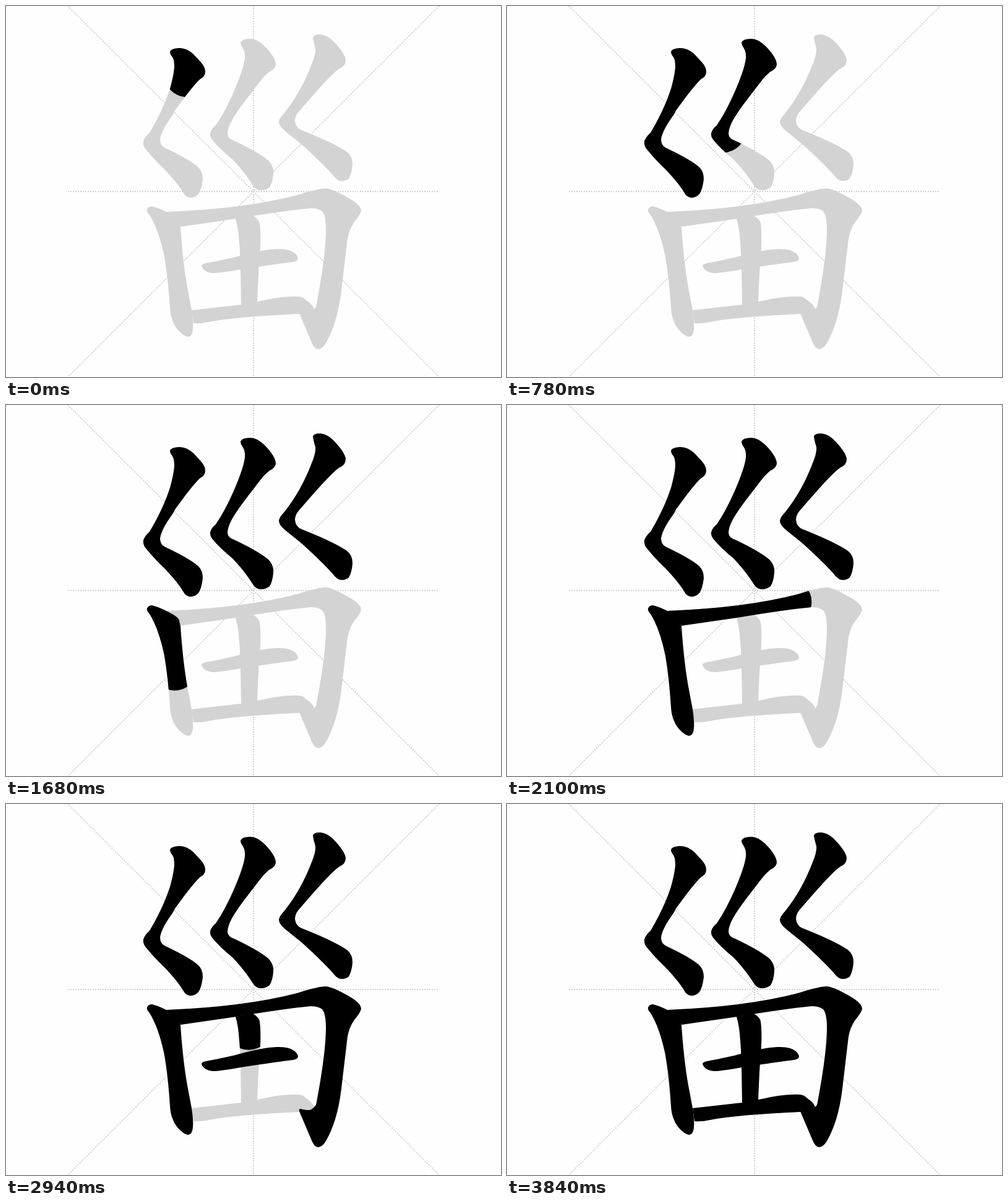
An HTML page for the animation above (3.9 s loop, 800x600 px).

```html
<!DOCTYPE html>
<html lang="zh">
<head>
<meta charset="utf-8">
<title>Stroke order</title>
<style>
  html, body { margin: 0; width: 100%; height: 100%; overflow: hidden; background: #fefefe; }
  svg { display: block; width: 100vw; height: 100vh; }
  .grid { stroke: #d3d3d3; stroke-width: 2; stroke-dasharray: 2 2; }
  .shadow { fill: #d3d3d3; }
  .brush { fill: none; stroke: #000; stroke-width: 75; stroke-linecap: round; stroke-linejoin: round; }
</style>
</head>
<body>
<svg id="stage" viewBox="0 0 800 600">
  <path class="grid" d="M100 300H700M400 0V600M100 0L700 600M700 0L100 600"/>
</svg>
<script>
const LOOP = 3900, STEP = 60;

// Each stroke: outline, brush path, start and duration in ms.
const strokes = [
  {
    outline: "M265 74Q266 69 279 68Q291 67 303 78L315 91Q322 99 322 106Q322 114 314 118Q307 124 290 146L273 169Q271 174 268 178Q250 203 249 216Q249 226 258 230Q296 248 310 260Q318 267 318 280Q316 297 311 304Q306 310 297 310Q290 309 286 301Q277 286 255 263Q240 249 227 233Q221 227 222 219Q224 212 232 205Q254 168 265 134Q272 108 272 97Q272 85 267 80Q265 77 265 74Z",
    brush: "M270 74L294 100L293 110L266 166L236 216L262 245L301 295",
    start: -129, time: 760
  },
  {
    outline: "M379 59Q381 53 395 53Q405 53 417 64Q436 83 436 95Q435 102 426 106Q418 112 409 124L386 154Q373 171 365 185Q358 198 358 207Q359 215 369 218Q409 237 424 250Q433 259 432 271Q431 285 426 293Q420 298 412 298Q404 298 399 290Q386 269 366 248Q345 231 333 216Q328 209 331 203Q333 198 339 193Q354 171 368 139Q384 102 386 85Q387 74 382 67Q379 63 379 59Z",
    brush: "M383 57L405 82L383 148L344 207L372 233L414 284",
    start: 329, time: 760
  },
  {
    outline: "M496 51Q497 46 508 46Q518 47 527 55Q547 75 549 87Q549 97 539 101Q525 110 473 171Q467 178 467 186Q468 197 478 201Q531 222 551 236Q560 243 560 256Q559 270 554 279Q549 283 543 283Q535 283 528 273Q511 254 478 224L452 203Q441 194 441 187Q442 181 449 174Q477 139 494 94Q501 78 500 68Q497 58 496 51Z",
    brush: "M500 50L521 86L489 138L454 187L485 215L543 268",
    start: 804, time: 760
  },
  {
    outline: "M228 329Q230 324 236 324Q245 326 259 333Q280 343 280 349L282 358Q286 416 293 455L300 492Q303 510 302 523Q301 535 294 535Q287 534 277 523Q266 509 265 488Q262 441 256 406Q247 362 232 338Q227 333 228 329Z",
    brush: "M232 329L262 350L272 420L290 510",
    start: 1254, time: 760
  },
  {
    outline: "M259 333Q385 328 470 306Q505 295 517 295Q530 296 561 315Q574 324 574 331Q573 336 567 344Q553 360 551 384L542 460Q536 512 517 545Q511 555 504 555Q498 554 494 544L474 497Q473 493 476 493Q484 495 489 495Q494 495 499 489Q501 488 502 482Q517 402 517 362Q517 339 511 332Q505 327 492 327Q450 331 372 344L282 357Q280 346 259 333Z",
    brush: "M265 345L400 328L500 310L540 322L533 400L512 485L500 525",
    start: 1719, time: 968
  },
  {
    outline: "M316 420Q317 417 323 416Q360 409 378 404Q415 394 437 393Q458 392 467 400Q472 405 472 409Q471 413 463 414Q444 416 379 426Q345 432 334 432Q322 431 317 423Z",
    brush: "M320 423L380 416L455 402",
    start: 2475, time: 520
  },
  {
    outline: "M371 344L399 339Q409 345 410 352Q412 365 411 391Q408 425 406 479L380 484Q379 400 377 383Q376 361 371 344Z",
    brush: "M373 340L392 356L393 485",
    start: 2827, time: 600
  },
  {
    outline: "M300 492L380 483Q413 477 426 474Q455 469 474 470Q481 471 484 475Q496 483 498 490Q493 496 488 496L473 498Q367 503 328 511Q315 514 303 513Z",
    brush: "M303 503L480 482",
    start: 3200, time: 640
  }
];

const stage = document.getElementById("stage");

function add(parent, name, attrs) {
  const node = document.createElementNS(stage.namespaceURI, name);
  for (const key in attrs) node.setAttribute(key, attrs[key]);
  return parent.appendChild(node);
}

strokes.forEach(s => add(stage, "path", { class: "shadow", d: s.outline }));
strokes.forEach((s, i) => {
  const clip = add(stage, "clipPath", { id: "clip" + i });
  add(clip, "path", { d: s.outline });
  s.node = add(stage, "path", { class: "brush", d: s.brush, "clip-path": `url(#clip${i})` });
  s.length = s.node.getTotalLength();
});

function draw(time) {
  for (const s of strokes) {
    const progress = Math.min(1, (time - s.start) / s.time);
    s.node.style.visibility = progress > 0 ? "visible" : "hidden";
    if (progress > 0) {
      s.node.style.strokeDasharray = `${progress * s.length} ${2 * s.length}`;
    }
  }
}

const begin = performance.now();
function tick() {
  const time = (performance.now() - begin) % LOOP;
  draw(Math.floor(time / STEP) * STEP);
  requestAnimationFrame(tick);
}
tick();
</script>
</body>
</html>
```
